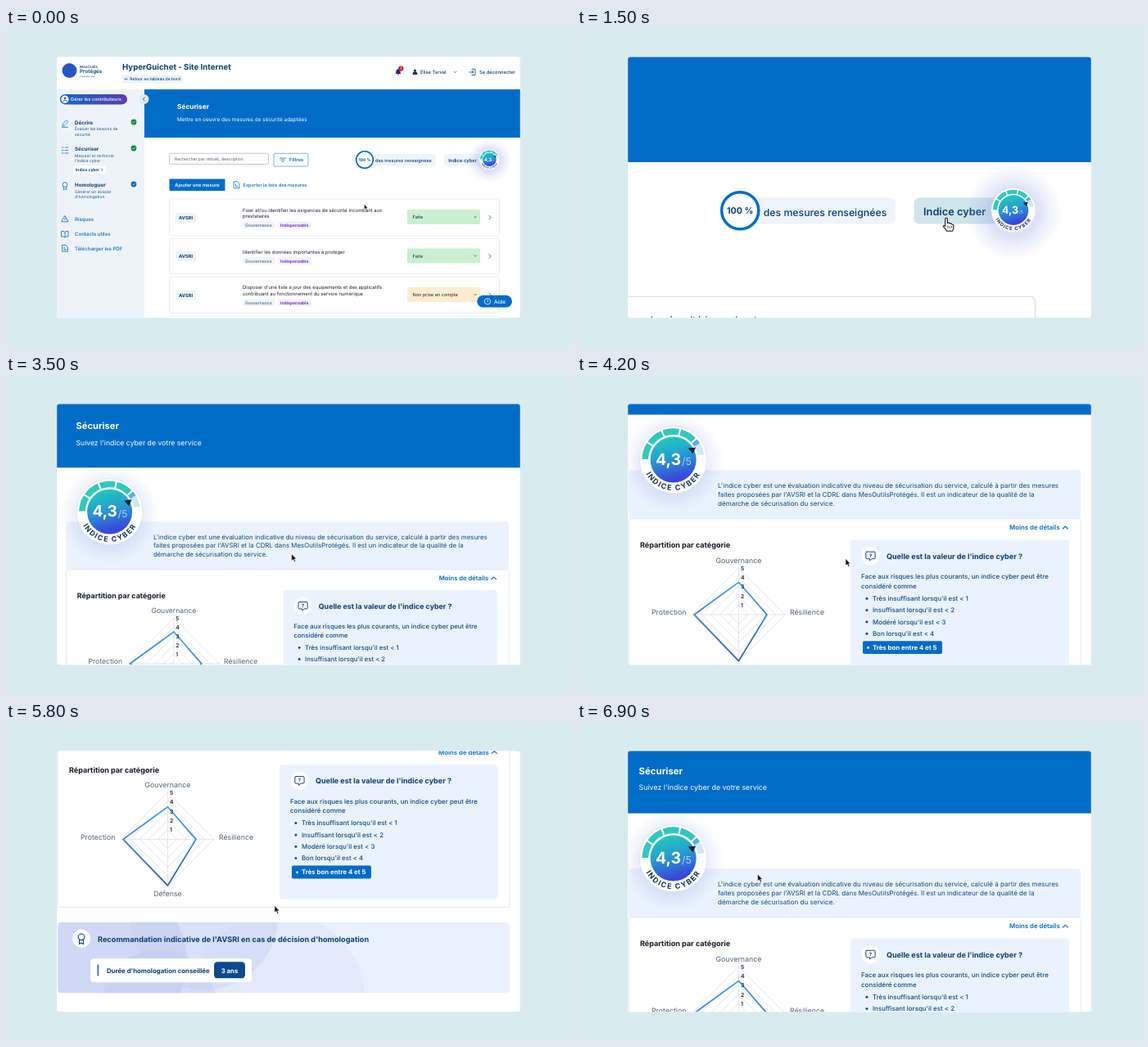
Recreate the animation shown at these times as an HTML page. Size 690x390 px, loop 7000 ms.

```html
<!DOCTYPE html>
<html lang="fr">
<head>
<meta charset="utf-8">
<title>Indice cyber</title>
<style>
  html, body { margin: 0; width: 100%; height: 100%; overflow: hidden; background: #daebf0; }
  svg { display: block; width: 690px; height: 390px; font-family: Inter, "Noto Sans", sans-serif; text-rendering: geometricPrecision; }
</style>
</head>
<body>
<svg id="stage" viewBox="0 0 690 390"></svg>
<script>
const BLUE = '#006cc8', NAVY = '#0b3f78', BODY = '#104a88', INK = '#1c2030', SOFT = '#eff4fa', PANEL = '#eaf3fd';

const text = (x, y, size, str, fill = NAVY, weight = 400, anchor = 'start') =>
  `<text x="${x}" y="${y}" font-size="${size}" fill="${fill}" font-weight="${weight}" text-anchor="${anchor}">${str.replace('<', '&lt;')}</text>`;
const lines = (x, y, gap, size, rows, fill, weight) =>
  rows.map((row, i) => text(x, y + i * gap, size, row, fill, weight)).join('');
const box = (x, y, w, h, fill, r = 0, extra = '') =>
  `<rect x="${x}" y="${y}" width="${w}" height="${h}" rx="${r}" fill="${fill}" ${extra}/>`;
const disc = (x, y, r, fill, extra = '') => `<circle cx="${x}" cy="${y}" r="${r}" fill="${fill}" ${extra}/>`;
const line = (d, stroke = NAVY, w = .7) =>
  `<path d="${d}" fill="none" stroke="${stroke}" stroke-width="${w}" stroke-linecap="round" stroke-linejoin="round"/>`;
const group = (id, body) => `<g id="${id}">${body}</g>`;
const border = (c, w = .5) => `stroke="${c}" stroke-width="${w}"`;

const polar = (r, deg) => {
  const a = deg * Math.PI / 180;
  return `${(r * Math.cos(a)).toFixed(2)} ${(-r * Math.sin(a)).toFixed(2)}`;
};
const arc = (r, from, to) => `M${polar(r, from)}A${r} ${r} 0 0 ${from > to ? 1 : 0} ${polar(r, to)}`;

function badge(x, y, scale, glow, slash) {
  let gauge = '';
  for (let i = 0; i < 5; i++) {
    const a = 179 - i * 34.5;
    gauge += `<path d="${arc(25, a, a - 31)}" fill="none" stroke="${i < 4 ? '#31c8be' : '#cfe5f4'}" stroke-width="5.6"/>`;
  }
  gauge += `<path d="${arc(25, 41, 32)}" fill="none" stroke="#58aee2" stroke-width="5.6"/>`;
  return `<g transform="translate(${x} ${y}) scale(${scale})">
    ${disc(0, 3, glow, 'url(#glow)')}${disc(0, 0, 30, '#fff', border('#dfe4f2', .6))}${gauge}
    ${disc(0, 0, 20.4, 'url(#core)')}
    <path d="M13.2 -10.2L20 -11L17.4 -5.2Z" fill="#10223f"/>
    ${text(-15.8, 4.4, 14.2, '4,3', '#fff', 700)}${text(7.6, 4.8, slash, '/5', '#a9d6f5')}
    <text font-size="6.5" font-weight="700" letter-spacing="1.15" fill="#14305c" text-anchor="middle"><textPath href="#rim" startOffset="50%">INDICE CYBER</textPath></text>
  </g>`;
}

const defs = `<defs>
  <clipPath id="view"><rect x="62.2" y="35.5" width="565.6" height="318.8" rx="3"/></clipPath>
  <clipPath id="advice"><rect x="200" y="385.7" width="401.8" height="63" rx="3"/></clipPath>
  <radialGradient id="glow"><stop offset=".5" stop-color="#8f9be0" stop-opacity=".3"/><stop offset="1" stop-color="#a9b4ee" stop-opacity="0"/></radialGradient>
  <linearGradient id="core" x2=".25" y2="1"><stop stop-color="#1fd3b4"/><stop offset=".5" stop-color="#259fd0"/><stop offset="1" stop-color="#3a45dc"/></linearGradient>
  <linearGradient id="pill"><stop stop-color="#1268c8"/><stop offset="1" stop-color="#5b3fae"/></linearGradient>
  <linearGradient id="web" x2="0" y2="1"><stop stop-color="#4ba0e6"/><stop offset="1" stop-color="#2a63b4"/></linearGradient>
  <path id="rim" d="${arc(27.3, 190, 270)}${arc(27.3, 270, 350).replace(/^M[^A]*/, '')}"/>
</defs>`;

const banner = sub => box(169, 75, 500, 59, BLUE) + text(209, 99, 8.3, 'Sécuriser', '#fff', 700) + text(209, 113.5, 6.45, sub, '#fff');
const docIcon = (x, y) => line(`M${x - 3} ${y - 4}h4l2.5 2.5v5.5h-6.5zM${x - 1} ${y - 1}v3h2.5`, BLUE, .8);

function card(top, height, mid, rows, state, tint) {
  const first = mid - (rows.length > 1 ? 7 : 5.3);
  const tags = mid + (rows.length > 1 ? 9.4 : 5.6);
  return box(199.5, top, 403, height, '#fff', 3, border('#d6d8de')) +
    box(207, mid - 6, 25, 12.4, SOFT, 3) + text(219.6, mid + 2.4, 5.7, 'AVSRI', NAVY, 700, 'middle') +
    lines(289, first + (rows.length > 1 ? 0 : 2), 7.9, 5.86, rows, INK) +
    box(289, tags - 4.3, 40, 8.6, '#f1f4f9', 3) + text(292, tags + 1.9, 5.1, 'Gouvernance', '#53647c', 500) +
    box(332, tags - 4.3, 41, 8.6, '#f2f0fc', 3) + text(335, tags + 1.9, 5.1, 'Indispensable', '#6a22cc', 600) +
    box(490, mid - 9.4, 89, 18, tint, 2) + text(496.5, mid + 1.6, 5.6, state, INK) +
    line(`M571.8 ${mid - 1}l1.4 1.4l1.4 -1.4`, INK, .6) + line(`M590 ${mid - 2.3}l2.2 2.3l-2.2 2.3`, BLUE, .9);
}

const listPage = banner('Mettre en oeuvre des mesures de sécurité adaptées') +
  box(199.5, 153.3, 121, 13.2, '#fff', 2, border('#8d929c')) + text(206, 161.8, 5.05, 'Rechercher par intitulé, description', '#555b68') +
  box(327, 153.3, 42, 15.8, '#fff', 1.5, border(BLUE)) + line('M334.5 159h7M335.8 161.2h4.4M337 163.4h2', BLUE, .8) +
  text(346, 163.4, 5.75, 'Filtres', BLUE, 600) +
  box(428, 153.9, 96.7, 14.6, SOFT, 3) + disc(438, 161.1, 10.3, '#fff', border(BLUE, 1.6)) +
  text(438, 163, 4.9, '100 %', NAVY, 700, 'middle') + text(451, 164, 5.62, 'des mesures renseignées', NAVY, 500) +
  box(535, 153.9, 55, 14.6, SOFT, 3, 'id="chip"') + text(540.2, 163.9, 5.85, 'Indice cyber', NAVY, 600) + badge(590.4, 160.8, .41, 66, 6) +
  box(199.5, 184.4, 68, 14.6, BLUE, 1) + text(233.5, 193.8, 5.75, 'Ajouter une mesure', '#fff', 600, 'middle') +
  docIcon(281.5, 191.8) + text(289.5, 193.8, 5.65, 'Exporter la liste des mesures', BLUE, 500) +
  card(209, 45, 231.5, ['Fixer et/ou identifier les exigences de sécurité incombant aux', 'prestataires'], 'Faite', '#c9f0d0') +
  card(257.6, 43, 279, ['Identifier les données importantes à protéger'], 'Faite', '#c9f0d0') +
  card(304.2, 44.4, 326.4, ["Disposer d'une liste à jour des équipements et des applicatifs", 'contribuant au fonctionnement du service numérique'], 'Non prise en compte', '#feebd0') +
  box(199.5, 352, 403, 40, '#fff', 3, border('#d6d8de'));

function radar(cx, cy, step) {
  const kite = (up, right, down, left) =>
    `M${cx} ${cy - up * step}L${cx + right * step} ${cy}L${cx} ${cy + down * step}L${cx - left * step} ${cy}Z`;
  let out = line(`M${cx} ${cy - 5 * step}v${10 * step}M${cx - 5 * step} ${cy}h${10 * step}`, '#cfd2d8', .4);
  for (let k = 1; k <= 5; k++) out += line(kite(k, k, k, k), '#cfd2d8', .4);
  out += line(kite(3.5, 3.05, 5, 4.8), 'url(#web)', 1.3);
  for (let k = 1; k <= 5; k++) out += text(cx + 1.8, cy - k * step + 1.7, 5, String(k), INK, 600);
  return out;
}

const levels = ["Très insuffisant lorsqu'il est < 1", "Insuffisant lorsqu'il est < 2", "Modéré lorsqu'il est < 3", "Bon lorsqu'il est < 4"];
const label = '#55617a';
const scorePage = banner("Suivez l'indice cyber de votre service") +
  box(200, 183, 401.8, 44, PANEL, 3) + badge(239.6, 174, 1, 45, 9) +
  lines(279.2, 198.9, 8, 5.85, [
    "L'indice cyber est une évaluation indicative du niveau de sécurisation du service, calculé à partir des mesures",
    "faites proposées par l'AVSRI et la CDRL dans MesOutilsProtégés. Il est un indicateur de la qualité de la",
    'démarche de sécurisation du service.'], BODY) +
  box(200, 226.5, 401.8, 145.8, '#fff', 2, border('#d8dfe9')) +
  text(538.3, 236.5, 5.7, 'Moins de détails', BLUE, 600) + line('M585.8 235.5l2.2 -2.2l2.2 2.2', BLUE, .8) +
  text(210, 252.5, 6.6, 'Répartition par catégorie', '#161a24', 700) + radar(297.7, 311.9, 8.24) +
  text(297.7, 266, 6.4, 'Gouvernance', label, 400, 'middle') + text(297.7, 362.8, 6.4, 'Défense', label, 400, 'middle') +
  text(220.2, 312.2, 6.4, 'Protection', label) + text(343.2, 312.2, 6.4, 'Résilience', label) +
  box(397.1, 245.3, 194.3, 120.4, PANEL, 3) + disc(414.9, 259.6, 8, '#fff') +
  line('M411.6 256h6.6q.8 0 .8 .8v4.6q0 .8 -.8 .8h-2.2l-1.8 1.6v-1.600h-2.600q-.8 0 -.8 -.8v-4.600q0 -.8 .8 -.8z'.replace(/00/g, ''), NAVY, .7) +
  text(414.9, 260.7, 4.4, '?', NAVY, 700, 'middle') +
  text(429.1, 262.3, 6.57, "Quelle est la valeur de l'indice cyber ?", NAVY, 700) +
  lines(406.6, 280.2, 8.3, 5.75, ['Face aux risques les plus courants, un indice cyber peut être', 'considéré comme'], BODY, 500) +
  lines(416.7, 299.6, 10.43, 5.75, levels, BODY, 500) +
  levels.map((_, i) => disc(411.6, 297.5 + i * 10.43, 1.1, BODY)).join('') +
  box(408, 335.3, 70.6, 11.6, BLUE, 1.5) + disc(412.8, 341.3, 1, '#fff') + text(416.7, 343.2, 5.7, 'Très bon entre 4 et 5', '#fff', 700) +
  `<g clip-path="url(#advice)">${box(200, 385.7, 401.8, 63, '#e8f1fd')}
    ${disc(395, 455, 78, '#dfe6fa', 'opacity=".6"')}${disc(330, 380, 66, '#cfd8f6', 'opacity=".6"')}${disc(245, 420, 70, '#c8d0f3', 'opacity=".75"')}${disc(290, 462, 52, '#c3cbf1', 'opacity=".5"')}</g>` +
  disc(221, 400.3, 8, '#fff') + disc(221, 398.8, 2.8, 'none', border(NAVY, .8)) + line('M219.2 401.2v4l1.8 -1.2l1.8 1.2v-4', NAVY, .8) +
  text(235.5, 403.5, 6.7, "Recommandation indicative de l'AVSRI en cas de décision d'homologation", NAVY, 700) +
  box(229, 418.1, 143.4, 21.1, '#fff', 3) + box(235.3, 423.3, .9, 10.2, NAVY) +
  text(243.5, 431.1, 5.7, "Durée d'homologation conseillée", NAVY, 700) +
  box(338.9, 421, 27.6, 14.6, '#0c4a8c', 3) + text(352.7, 430.7, 5.7, '3 ans', '#fff', 700, 'middle');

const header = box(62, 35, 567, 40, '#fff') + disc(77.5, 52, 9, '#2456c4') +
  text(90, 48.6, 4.6, 'MesOutils', NAVY, 500) + text(90, 55.4, 6.3, 'Protégés', NAVY, 600) + text(90, 59.6, 2.3, "L'innovation utile") +
  text(142, 51.2, 9.7, 'HyperGuichet - Site Internet', NAVY, 700) +
  box(142, 57.5, 74, 10, SOFT, 2) + line('M148.5 62.4h-3.4m1.3 -1.3l-1.3 1.3l1.3 1.3', NAVY, .5) + text(151.3, 64.3, 5, 'Retour au tableau de bord', NAVY, 500) +
  '<path d="M475.5 56c1 -.9 1 -2 1 -3.2a2.5 2.5 0 0 1 5 0c0 1.2 0 2.3 1 3.2zM478 56.6h2a1 1 0 0 1 -2 0z" fill="#2a2380"/>' +
  disc(482.3, 49.6, 3.2, '#d3202f') + text(482.3, 51.1, 4.2, '1', '#fff', 600, 'middle') +
  disc(499.5, 52, 1.6, '#1e2a78') + '<path d="M496.7 57v-1a2.3 2.3 0 0 1 5.6 0v1z" fill="#1e2a78"/>' +
  text(506, 56, 5.8, 'Élise Tarvel', NAVY, 500) + line('M547 53.2l1.5 1.5l1.5 -1.5') +
  line('M569 50.3h4v7.2h-4M566 53.9h4.8m-1.7 -1.7l1.7 1.7l-1.7 1.7', NAVY, .8) + text(578, 56, 5.8, 'Se déconnecter', NAVY, 500);

const status = (y, fill) => disc(156, y, 3.4, fill) + line(`M154.5 ${y}l1.1 1.1l2 -2.1`, '#fff');
const step = (y, title, rows) => text(84, y, 6.25, title, NAVY, 700) + lines(84, y + 7.3, 6.7, 4.95, rows, '#1b568f');
const sidebar = box(62, 75, 107, 280, '#eef3f9') + box(66, 81, 82, 12.4, 'url(#pill)', 6.2) +
  disc(72, 87.2, 4.6, '#fff') + disc(72, 85.8, 1.4, '#2058b8') + line('M69.8 89.6a2.3 2 0 0 1 4.4 0', '#2058b8', 1) +
  text(79, 89.3, 5.6, 'Gérer les contributeurs', '#fff', 500) +
  line('M69 119.5l.5 -2.5l4.5 -4.5l2 2l-4.5 4.5zM68.5 121.3h7', BLUE, .8) +
  step(118, 'Décrire', ['Évaluer les besoins de', 'sécurité']) + status(115, '#128a3c') +
  [146, 149.5, 153].map(y => line(`M68 ${y}l.8 .8l1.2 -1.5M72 ${y}h4`, BLUE, .8)).join('') +
  step(150.2, 'Sécuriser', ['Mesurer et renforcer', "l'indice cyber"]) + status(147, '#128a3c') +
  box(82, 168.3, 40, 9.8, '#fff', 2) + text(85, 175, 4.85, 'Indice cyber', NAVY, 700) + line('M116.5 171.8l1.3 1.5l-1.3 1.5') +
  disc(72, 191.5, 2.9, 'none', border(BLUE, .8)) + line('M70.2 194v3.8l1.8 -1.2l1.8 1.2v-3.8', BLUE, .8) +
  step(194.2, 'Homologuer', ['Générer un dossier', "d'homologation"]) + status(191, BLUE) +
  line('M72 229.8l4 7h-8zM72 232.5v2', BLUE, .8) + text(84, 236.3, 6.1, 'Risques', BLUE, 500) +
  line('M72 249.5v6.5M68 248.5h3l1 1l1 -1h3v6.5h-3l-1 1l-1 -1h-3z', BLUE, .8) + text(84, 254.1, 6.1, 'Contacts utiles', BLUE, 500) +
  docIcon(72, 269.3) + text(84, 271.7, 6.1, 'Télécharger les PDF', BLUE, 500) +
  disc(168.5, 87, 6, '#dcebf7') + line('M169.3 85l-2 2l2 2', NAVY, .8);

const help = box(575.3, 326.8, 42.7, 14.8, BLUE, 7.4) + disc(588, 334.2, 3.7, 'none', border('#fff', .8)) +
  text(588, 336, 5, '?', '#fff', 600, 'middle') + text(596, 336.6, 6.5, 'Aide', '#fff', 500);

const pointer = group('arrow', '<path d="M0 0V6.2L1.5 4.9L2.6 7.2L3.6 6.7L2.6 4.5H4.4Z" fill="#111" stroke="#fff" stroke-width=".4"/>') +
  group('hand', '<path d="M-.6 .6a.6 .6 0 0 1 1.2 0V2.8q1 -.5 1.2 .3q1 -.3 1.2 .4q1 0 1 .8v1q0 1 -.6 2H.2Q-.3 6 -1.8 4.7q.2 -.9 1.2 -.1Z" fill="#fff" stroke="#111" stroke-width=".5" stroke-linejoin="round"/><path d="M.8 4.3v1.5M1.8 4.3v1.5M2.8 4.3v1.5" stroke="#111" stroke-width=".3"/>');

const stage = document.getElementById('stage');
stage.innerHTML = defs + box(0, 0, 690, 390, '#daebf0') +
  `<g clip-path="url(#view)">${box(62, 35, 566, 320, '#fff')}` +
  group('camera', group('list', listPage) + group('score', scorePage) + header + sidebar + help + group('cursor', pointer)) + '</g>';

const part = {};
for (const id of ['camera', 'list', 'score', 'cursor', 'arrow', 'hand', 'chip']) part[id] = document.getElementById(id);

// Tracks: [time, values, easing towards this key]
const easeIn = p => p * p, easeOut = p => 1 - (1 - p) ** 2;
const easeBoth = p => p * p * (3 - 2 * p);
const wide = [1, 0, 0], onIndex = [2.19, -760, -129.5], onScore = [1.374, -211.6, -72.5];
const cameraTrack = [[800, wide], [1500, onIndex, easeBoth], [1900, onIndex], [2700, wide, easeBoth], [3000, wide], [3600, onScore, easeBoth]];
const cursorTrack = [[0, [437.5, 215.5]], [1300, [553, 165.2], easeBoth], [3000, [553, 165.2]],
  [3600, [392.7, 216.2], easeBoth], [6500, [392.7, 216.2]], [6800, [314.5, 188.2], easeBoth]];
const scrollTrack = [[4000, [0]], [4200, [45.9], easeIn], [4800, [159], easeOut], [5200, [159.3]],
  [5700, [159.3]], [6100, [87], easeIn], [6700, [0], easeOut]];

function sample(track, t) {
  const i = track.findIndex(key => key[0] > t);
  if (i === 0) return track[0][1];
  if (i < 0) return track[track.length - 1][1];
  const [t0, a] = track[i - 1], [t1, b, ease = p => p] = track[i];
  const p = ease((t - t0) / (t1 - t0));
  return a.map((v, k) => v + (b[k] - v) * p);
}

const LOOP = 7000, TICK = 100, OPEN = 2100, PRESS = 1800;
const show = (el, on) => el.setAttribute('display', on ? 'inline' : 'none');

function draw(now) {
  const t = Math.floor(now % LOOP / TICK) * TICK;
  const [zoom, x, y] = sample(cameraTrack, t);
  const [cx, cy] = sample(cursorTrack, t);
  const opened = t >= OPEN;
  const hover = !opened && cx > 535 && cy < 168.5;
  part.camera.setAttribute('transform', `translate(${x} ${y}) scale(${zoom})`);
  part.cursor.setAttribute('transform', `translate(${cx} ${cy})`);
  part.score.setAttribute('transform', `translate(0 ${-sample(scrollTrack, t)[0]})`);
  part.chip.setAttribute('fill', !hover ? SOFT : t < PRESS ? '#d0e5ec' : '#c3dde7');
  show(part.list, !opened);
  show(part.score, opened);
  show(part.hand, hover);
  show(part.arrow, !hover);
}

function tick() {
  draw(performance.now());
  requestAnimationFrame(tick);
}
tick();
</script>
</body>
</html>
```
